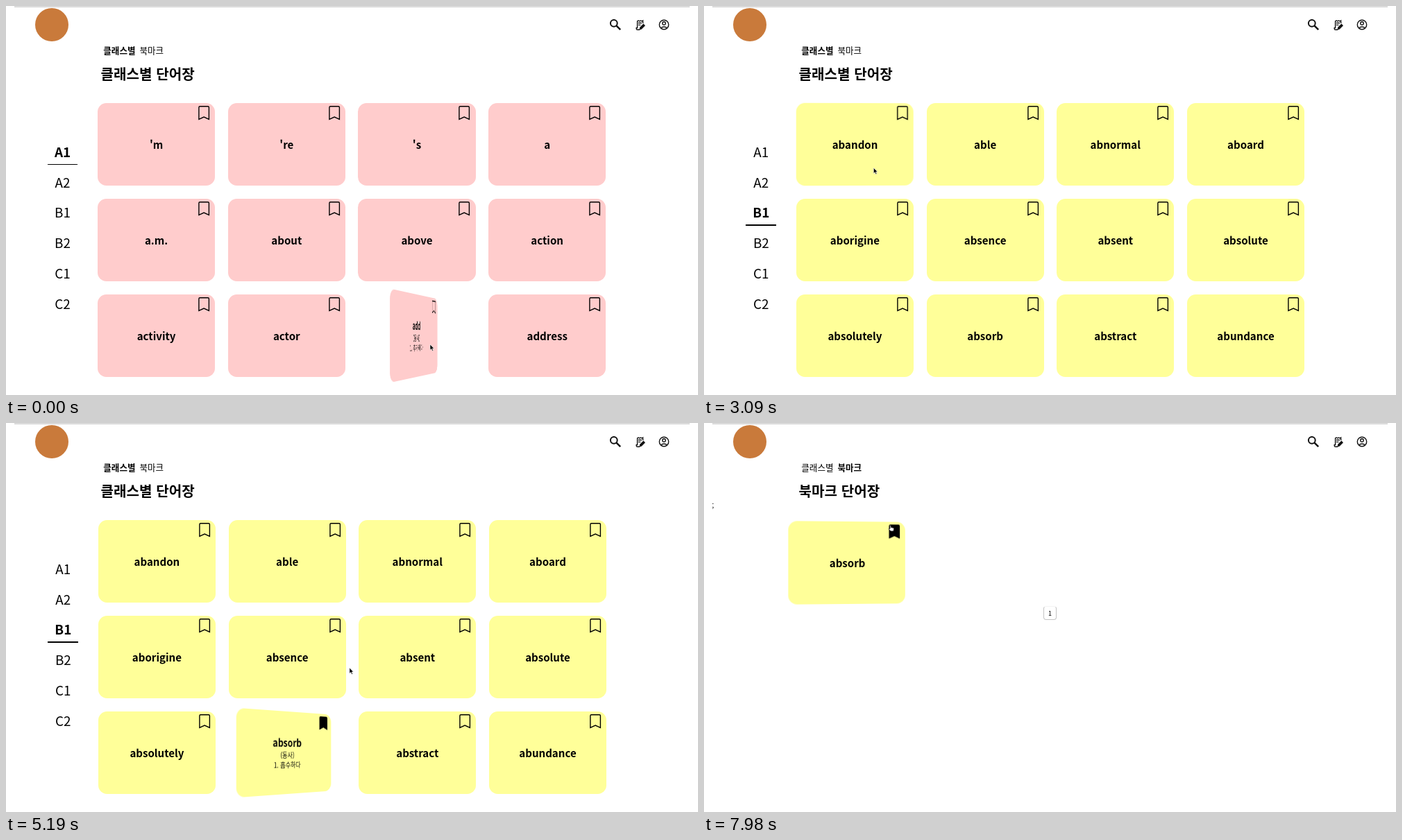
An HTML page that plays this animation: 997x561 px, repeating every 8000 ms.

```html
<!DOCTYPE html>
<html lang="ko">
<head>
<meta charset="utf-8">
<title>단어장</title>
<style>
  html, body { margin: 0; width: 100%; height: 100%; overflow: hidden; background: #fff; }
  body { position: relative; color: #000; font-family: "Noto Sans CJK KR", "Noto Sans CJK", "Noto Sans", sans-serif; }
  body > svg { position: absolute; left: 0; top: 0; }
  .text { position: absolute; height: 30px; line-height: 30px; white-space: pre; }
  .bold { font-weight: 700; }
  .level { left: 50px; width: 63px; text-align: center; font-size: 18.84px; }
  #underline { position: absolute; left: 60px; height: 1.2px; background: #000; }
  .card { position: absolute; width: 169.2px; height: 119.2px; border-radius: 12.5px; }
  .face { width: 100%; height: 100%; display: flex; flex-direction: column; align-items: center; justify-content: center; font-size: 10.05px; line-height: 14.55px; }
  .face b { font-size: 15.07px; line-height: 21.8px; }
  .card svg { position: absolute; left: 144px; top: 3px; }
  #page { position: absolute; left: 489px; top: 264px; width: 17px; height: 18px; border: 1px solid #c4c4c4; border-top-color: #f4f4f4; border-radius: 4px; font-size: 9px; line-height: 19px; text-align: center; font-weight: 500; }
</style>
</head>
<body>
<svg width="997" height="561" fill="none" stroke="#111">
  <path d="M12 1.2H985" stroke="#c4c4c4" stroke-width="1.3"/>
  <circle cx="66" cy="27" r="24" fill="#c97a3b" stroke="none"/>
  <g stroke-width="2">
    <circle cx="875.8" cy="24.8" r="4.9"/>
    <path d="M879.6 28.6l5.6 5.6" stroke-width="2.4"/>
  </g>
  <g stroke-width="1.4">
    <path d="M917.6 25v-4l-1.6 1-1.6-1-1.6 1-1.6-1-1.6 1v9.5h-1.4v1.2q0 1.6 1.7 1.6h3.2M911 24.5h5M911 27.4h3.4"/>
    <path d="M913.4 33.4l.4-2.2 4.6-4.6 1.6 1.6-4.6 4.6z" fill="#111"/>
  </g>
  <g stroke-width="1.4">
    <circle cx="948" cy="27" r="6.7"/>
    <circle cx="948" cy="24.9" r="2.2"/>
    <path d="M943.4 31.8q4.6-3.6 9.2 0"/>
  </g>
</svg>
<div class="text" id="byClass" style="left:140.3px;top:49px;font-size:12.56px">클래스별</div>
<div class="text" id="byMark" style="left:192.5px;top:49px;font-size:12.56px">북마크</div>
<div class="text bold" id="title" style="left:136.6px;top:83px;font-size:20.1px"></div>
<div id="sidebar"><div id="underline"></div></div>
<div id="extras">
  <div class="text" style="left:11.5px;top:104px;font-size:10.05px">;</div>
  <div id="page">1</div>
</div>
<svg id="cursor" width="24" height="24" overflow="visible">
  <path id="arrow" d="M0 0V8.2L1.9 6.5 3.2 9.4 4.6 8.8 3.3 6H5.7Z" fill="#000" stroke="#fff" stroke-width=".6"/>
  <path id="hand" d="M1.2.6q.9-.8 1.4.3V3.2l3.4.8q1 .3.8 1.4L6.2 8.6H2.4L-.6 5.6q-.1-1 1-.8l.8.6Z" fill="#fff" stroke="#222" stroke-width=".8"/>
</svg>

<script>
const LOOP = 8000, FLIP = 700, HOLD = 480;
const A2_PICKED = 1900, A2_LOADED = 2070, B1_PICKED = 2450, B1_LOADED = 2790;
const MARKED = 4440, MARK_PAGE = 6720, MARK_LOADED = 6810;
const $ = id => document.getElementById(id);

const views = {
  A1: { color: '#ffcccc', x: 132, y: 140.2, words: "'m,'re,'s,a,a.m.,about,above,action,activity,actor,add,address" },
  A2: { color: '#ffdd99', x: 132, y: 140.2, words: 'ability,abroad,accent,accept,accident,ache,across,act,active,actress,ad,adult' },
  B1: { color: '#ffff99', x: 132.8, y: 140.2, words: 'abandon,able,abnormal,aboard,aborigine,absence,absent,absolute,absolutely,absorb,abstract,abundance' },
  mark: { color: '#ffff99', x: 121.8, y: 142.2, words: 'absorb' },
};
const meanings = { add: '추가하다', abandon: '버리다', absorb: '흡수하다' };

// Hover intervals that turn a card over and back
const flips = [
  { view: 'A1', word: 'add', on: 224, off: 770 },
  { view: 'B1', word: 'abandon', on: 3080, off: 3270 },
  { view: 'B1', word: 'absorb', on: 3622, off: 5080 },
  { view: 'mark', word: 'absorb', on: 7952, off: LOOP },
];

// time, x, y, pointing hand
const path = [
  [0, 611, 488], [480, 611, 488], [770, 604, 535], [1000, 300, 535], [1200, 112, 505], [1320, 112, 505],
  [1780, 80, 266, 1], [2130, 80, 266, 1], [2400, 84, 296, 1], [2970, 84, 296],
  [3090, 244, 233], [3280, 310, 290], [3500, 312, 400], [3622, 335, 420], [4080, 473, 455],
  [4300, 473, 430, 1], [4900, 473, 430], [5080, 492, 425], [5350, 499, 250], [5550, 470, 125],
  [5700, 395, 58], [6180, 300, 66], [6420, 210, 64, 1], [7020, 210, 64], [7170, 432, 84],
  [7500, 430, 120], [7800, 300, 75], [7950, 268, 143, 1], [LOOP, 266, 150, 1],
];

function makeCard(view, word, i) {
  const card = document.createElement('div');
  card.className = 'card';
  card.style.cssText = `left:${view.x + i % 4 * 187.7}px;top:${view.y + Math.floor(i / 4) * 138}px;background:${view.color}`;
  card.innerHTML = `<div class="face"></div><svg width="18" height="24" stroke="#000" stroke-width="1.4" fill="none">
    <path d="M1.9 3.2Q1.9 1.7 3.4 1.7H14.9Q16.4 1.7 16.4 3.2V20.3L9.15 17 1.9 20.3Z"/></svg>`;
  const face = card.firstChild;
  const front = `<b>${word}</b>`;
  const back = `${front}<span>(동사)</span><span>1. ${meanings[word]}</span>`;
  let shown;
  const turn = angle => {
    const side = angle < 90 ? front : back;
    if (side !== shown) face.innerHTML = shown = side;
    const tilt = Math.min(angle, 180 - angle);
    card.style.transform = tilt > 0.1 ? `perspective(628px) rotateY(${tilt}deg)` : 'none';
  };
  turn(0);
  return { card, turn, icon: card.querySelector('path') };
}

for (const view of Object.values(views)) {
  view.box = document.createElement('div');
  view.cards = {};
  view.words.split(',').forEach((word, i) => {
    view.cards[word] = makeCard(view, word, i);
    view.box.append(view.cards[word].card);
  });
  document.body.insertBefore(view.box, $('cursor'));
}
views.mark.cards.absorb.icon.setAttribute('fill', '#000');

const levels = ['A1', 'A2', 'B1', 'B2', 'C1', 'C2'].map((name, i) => {
  const label = document.createElement('div');
  label.className = 'text level';
  label.style.top = 194.8 + i * 43.8 + 'px';
  label.textContent = name;
  $('sidebar').append(label);
  return label;
});

// CSS "ease" curve: cubic-bezier(.25, .1, .25, 1)
function ease(x) {
  if (x <= 0) return 0;
  if (x >= 1) return 1;
  const bezier = (s, a, b) => 3 * (1 - s) ** 2 * s * a + 3 * (1 - s) * s * s * b + s ** 3;
  let low = 0, high = 1;
  for (let i = 0; i < 20; i++) {
    const mid = (low + high) / 2;
    if (bezier(mid, 0.25, 0.25) < x) low = mid; else high = mid;
  }
  return bezier(low, 0.1, 1);
}

function flipAngle({ on, off }, t) {
  const reached = ease((Math.min(t, off) - on) / FLIP);
  return 180 * reached * (t > off ? 1 - ease((t - off) / (FLIP * reached)) : 1);
}

const show = (element, visible) => { element.style.display = visible ? '' : 'none'; };

function moveCursor(t) {
  const next = Math.max(1, path.findIndex(p => p[0] > t));
  const [t0, x0, y0, hand] = path[next - 1], [t1, x1, y1] = path[next];
  const k = (t - t0) / (t1 - t0);
  $('cursor').style.transform = `translate(${x0 + (x1 - x0) * k}px, ${y0 + (y1 - y0) * k}px)`;
  show($('hand'), hand);
  show($('arrow'), !hand);
}

function render(time) {
  const t = Math.max(HOLD, time);
  const onMarkPage = t >= MARK_PAGE;
  const current = t < A2_LOADED ? 'A1' : t < B1_LOADED ? 'A2' : !onMarkPage ? 'B1' : t >= MARK_LOADED ? 'mark' : '';
  for (const name in views) show(views[name].box, name === current);

  $('byClass').classList.toggle('bold', !onMarkPage);
  $('byMark').classList.toggle('bold', onMarkPage);
  $('title').textContent = onMarkPage ? '북마크 단어장' : '클래스별 단어장';
  show($('extras'), t >= MARK_LOADED);

  const picked = t < A2_PICKED ? 0 : t < B1_PICKED ? 1 : 2;
  const shift = t >= B1_LOADED ? 0.8 : 0;
  show($('sidebar'), !onMarkPage);
  levels.forEach((label, i) => {
    label.classList.toggle('bold', i === picked);
    label.style.marginLeft = shift + 'px';
  });
  $('underline').style.top = 227.8 + picked * 43.8 + 'px';
  $('underline').style.width = 43.2 + shift + 'px';

  for (const flip of flips) views[flip.view].cards[flip.word].turn(flipAngle(flip, t));
  views.B1.cards.absorb.icon.setAttribute('fill', t >= MARKED ? '#000' : 'none');
  moveCursor(t);
}

const start = performance.now();
function tick() {
  render((performance.now() - start) % LOOP);
  requestAnimationFrame(tick);
}
tick();
</script>
</body>
</html>
```
